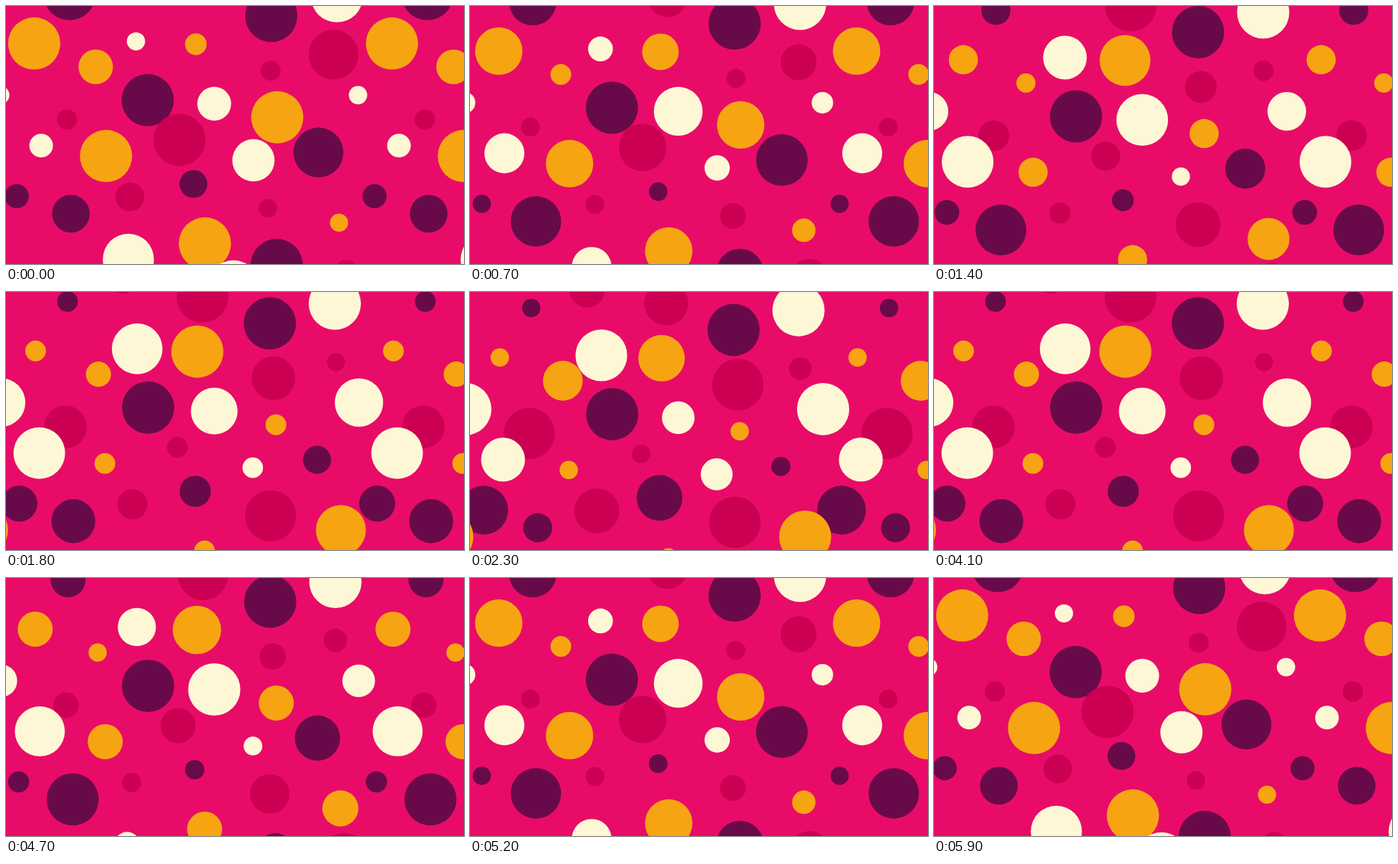
An HTML page with a canvas for the animation above (6000 ms loop, 640x360 px).

```html
<!DOCTYPE html>
<html lang="en">
<head>
<meta charset="utf-8">
<title>Drifting dots</title>
<style>
  html, body { margin: 0; width: 100%; height: 100%; overflow: hidden; background: #e80c68; }
  canvas { display: block; width: 640px; height: 360px; }
</style>
</head>
<body>
<canvas id="stage" width="640" height="360"></canvas>
<script>
const ctx = document.getElementById('stage').getContext('2d');
const TAU = Math.PI * 2;
const TILE = 500;    // the pattern repeats sideways
const STEP = 100;    // ms per pose
const STEPS = 30;    // poses one way, then back again
const MID = 0.489;   // progress at which the dots sit on their listed points
const DRIFT = 46.3;
const SWING = 227;   // degrees of pulse in one pass

// Each dot: x, y, pulse phase in degrees; without a phase it keeps its full size.
const layers = {
  '#680a4a': [
    [86.5, 6, -3], [369, 36.5], [198.5, 154], [435, 227, 325],
    [264, 271, 112], [18, 288, 126], [93.5, 312.5, 277], [376, 384, -3]
  ],
  '#cc0052': [
    [460.5, 90.5, 36], [373, 113, 149], [83.5, 181, 146],
    [240, 209.5, -3], [176, 289, 109], [369, 305, 189],
    [473, 395, 240], [275, -0.5, 232], [164, -20, 81]
  ],
  '#f7a413': [
    [41, 75, -3], [128.5, 107.5, 92], [267, 76, 222], [377.5, 178, -3],
    [138.5, 232, -3], [467.5, 325, 179], [277.5, 354, -3]
  ],
  '#fef7d6': [
    [183, 72, 185], [291, 159, 266], [493, 147, 169], [47, 217.5, 232],
    [345, 238, 69], [169, 376, 25], [460, 9], [316, 414, -3]
  ]
};

const rad = degrees => degrees * Math.PI / 180;

// Gentle start, nearly even speed afterwards.
const progress = u => u * (0.863 + 0.397 * u - 0.183 * u * u);

// Sideways lean comes in bands down the stage and fades out towards the end.
const lean = y => 0.5 + 4 * Math.cos(TAU * (y - 108) / 190);
const leanEase = s => Math.sin(s * TAU / 4);

// The pulse lingers a little at its largest and smallest sizes.
function radius(phase, s) {
  if (phase === undefined) return 36.5;
  const angle = phase + SWING * s;
  return 24.6 + 11.9 * Math.cos(rad(angle - 5 * Math.sin(rad(2 * angle))));
}

function drawDot([x, y, phase], s) {
  const left = x + lean(y) * (leanEase(s) - leanEase(MID));
  const top = y + DRIFT * (s - MID);
  for (const shift of [-TILE, 0, TILE]) {
    ctx.beginPath();
    ctx.arc(left + shift, top, radius(phase, s), 0, TAU);
    ctx.fill();
  }
}

function draw(time) {
  const step = Math.floor(time / STEP) % (2 * STEPS);
  const pose = Math.min(step, 2 * STEPS - 1 - step);
  const s = progress(pose / (STEPS - 1));
  ctx.fillStyle = '#e80c68';
  ctx.fillRect(0, 0, 640, 360);
  for (const [color, dots] of Object.entries(layers)) {
    ctx.fillStyle = color;
    dots.forEach(dot => drawDot(dot, s));
  }
}

const begin = performance.now();
function tick() {
  draw(performance.now() - begin);
  requestAnimationFrame(tick);
}
tick();
</script>
</body>
</html>
```
